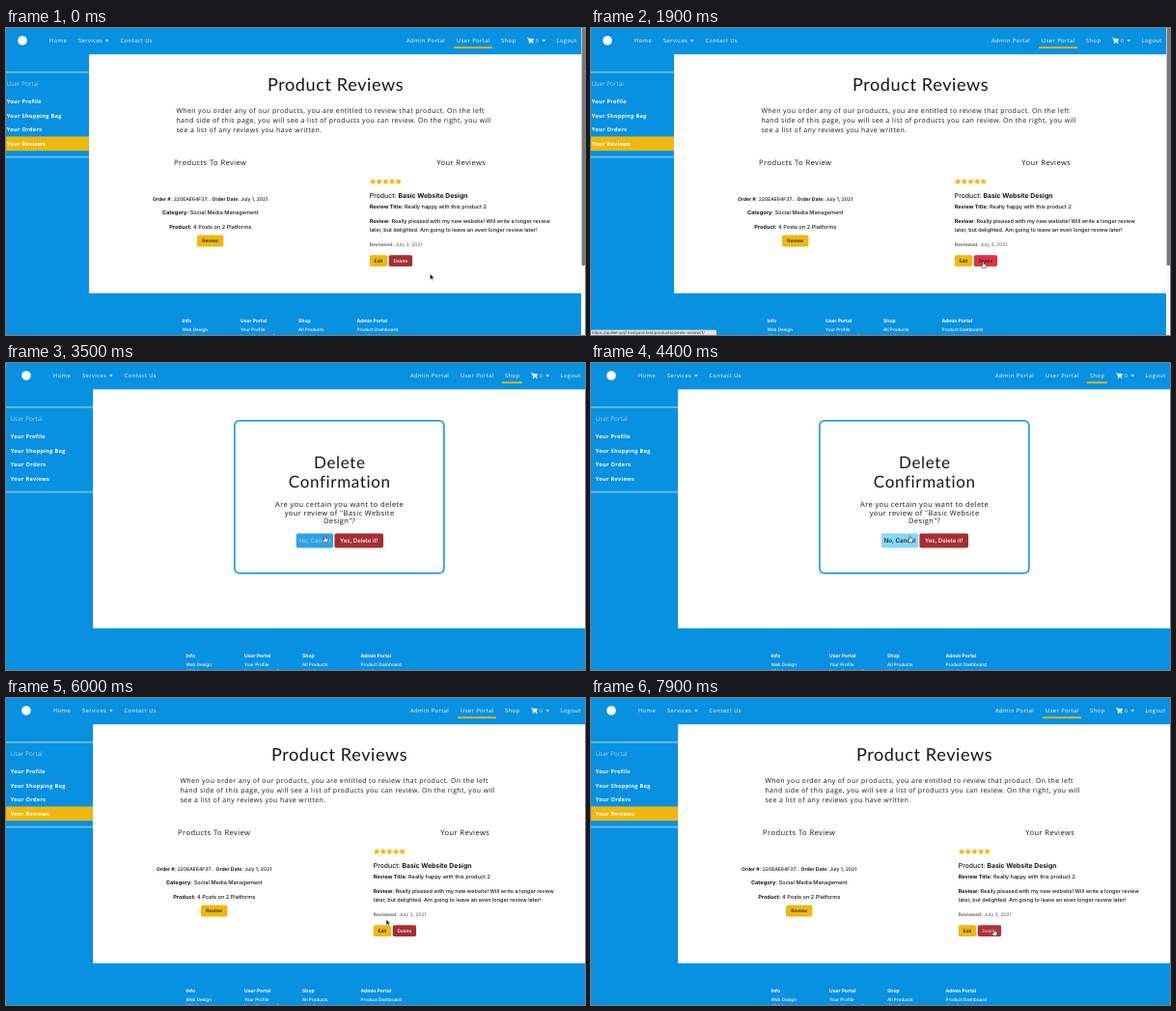
Write an HTML page that moves like this. It is 600 px wide and 318 px high and loops after 8 s.

```html
<!DOCTYPE html>
<html lang="en">
<head>
<meta charset="utf-8">
<title>Product reviews</title>
<style>
  html, body { margin: 0; width: 100%; height: 100%; overflow: hidden; background: #0890e1; }
  svg { display: block; width: 600px; height: 318px; }
  text { white-space: pre; text-rendering: geometricPrecision; }
  .open { font-family: "Open Sans", "Noto Sans", sans-serif; letter-spacing: .417px; font-weight: 450; }
  .ui { font-family: Inter, Roboto, sans-serif; font-weight: 450; }
  .head { font-family: Lato, "Open Sans", sans-serif; }
  .mid { text-anchor: middle; }
  .w { fill: #fff; }
  .k { fill: #14171a; }
  .b { font-weight: 650; }
</style>
</head>
<body>
<svg id="stage" viewBox="0 0 600 318" xmlns="http://www.w3.org/2000/svg"></svg>
<script>
const BLUE = '#0890e1', GOLD = '#efb810', RED = '#a52e36', INK = '#14171a';
const LOOP = 8000, TO_CONFIRM = 2150, TO_REVIEWS = 5250;

const text = (x, y, size, cls, s, extra = '') =>
  `<text x="${x}" y="${y}" font-size="${size}" class="${cls}" ${extra}>${s}</text>`;
const rect = (x, y, w, h, fill, extra = '') =>
  `<rect x="${x}" y="${y}" width="${w}" height="${h}" fill="${fill}" ${extra}/>`;
const bold = s => `<tspan class="b">${s}</tspan>`;
const button = (id, x, y, w, h, fill, cls, size, s, extra) =>
  `<g id="${id}">${rect(x, y, w, h, fill, 'rx="1.8"')}` +
  text(x + w / 2, y + h / 2 + size * .36, size, 'ui mid ' + cls, s, extra) + '</g>';
const caret = x => `<path d="M${x} 12.2h3.6l-1.8 2z" fill="#fff"/>`;

function star(cx, cy) {
  let d = '';
  for (let i = 0; i < 10; i++) {
    const r = i % 2 ? 1.65 : 3.4, a = (i / 5 - .5) * Math.PI;
    d += (i ? 'L' : 'M') + (cx + r * Math.cos(a)).toFixed(2) + ' ' + (cy + r * Math.sin(a)).toFixed(2);
  }
  return `<path d="${d}z" fill="${GOLD}"/>`;
}

function nav() {
  const items = [[45, 'Home'], [75, 'Services'], [118.5, 'Contact Us'], [415, 'Admin Portal'],
    [467, 'User Portal'], [513, 'Shop'], [570.5, 'Logout']];
  return '<circle cx="17" cy="13" r="4.8" fill="#fff"/>' +
    items.map(([x, s]) => text(x, 15.4, 5.8, 'open w', s, 'style="font-weight:500"')).join('') +
    caret(103) + caret(555.4) + text(548.9, 15.2, 5, 'open w', '0', 'style="font-weight:500"') +
    `<path d="M540 10.3h1.4l.9 4.2h4" fill="none" stroke="#fff" stroke-width=".7"/>
     <path d="M541.6 10.9h5.2l-.7 2.8h-3.9z" fill="#fff"/>
     <circle cx="542.7" cy="15.5" r=".7" fill="#fff"/><circle cx="545.7" cy="15.5" r=".7" fill="#fff"/>` +
    rect(464, 19.4, 40, 1.8, GOLD, 'id="lineUser"') + rect(510, 19.4, 21, 1.8, GOLD, 'id="lineShop"');
}

function sidebar() {
  const items = ['Your Profile', 'Your Shopping Bag', 'Your Orders', 'Your Reviews'];
  return rect(-4, 44.9, 90, 1.8, '#6bbff1') + rect(-4, 132.7, 90, 1.8, '#6bbff1') +
    rect(-4, 112.4, 90, 14.8, GOLD, 'id="active"') +
    text(.7, 60.4, 6.3, 'open w', 'User Portal', 'style="letter-spacing:.12px;font-weight:350"') +
    items.map((s, i) => text(.7, 78.1 + i * 14.55, 5.6, 'open w b', s, 'style="letter-spacing:.3px"')).join('');
}

function footer() {
  const cols = [
    [182.5, 'Info', 'Web Design', 'SEO Services'],
    [243, 'User Portal', 'Your Profile', 'Your Shopping Bag'],
    [303, 'Shop', 'All Products', 'Web Design'],
    [363.5, 'Admin Portal', 'Product Dashboard', 'User Dashboard']];
  return cols.map(([x, title, ...links]) => text(x, 304.8, 5, 'ui w b', title) +
    links.map((s, i) => text(x, 314.2 + i * 6.9, 4.6, 'ui w', s, 'style="font-weight:500"')).join('')).join('');
}

function reviews() {
  const intro = [
    'When you order any of our products, you are entitled to review that product. On the left',
    'hand side of this page, you will see a list of products you can review. On the right, you will',
    'see a list of any reviews you have written.'];
  return text(341.6, 64.8, 18.1, 'head mid k', 'Product Reviews', 'letter-spacing=".6"') +
    intro.map((s, i) => text(176.4, 87.9 + i * 10.1, 6.95, 'open k', s)).join('') +
    text(211.7, 141.6, 7.55, 'open mid k', 'Products To Review') +
    text(471.7, 141.6, 7.55, 'open mid k', 'Your Reviews') +
    text(211.7, 178.9, 5.05, 'ui mid k', bold('Order #:') + ' 220EAE64F37... ' + bold('Order Date:') + ' July 1, 2021') +
    text(211.7, 193.3, 5.6, 'ui mid k', bold('Category:') + ' Social Media Management') +
    text(211.7, 207.8, 5.6, 'ui mid k', bold('Product:') + ' 4 Posts on 2 Platforms') +
    button('review', 198, 214.5, 27.4, 12, GOLD, 'k', 4.9, 'Review') +
    [0, 1, 2, 3, 4].map(i => star(380.1 + i * 6.65, 159.2)).join('') +
    text(376.8, 176.2, 6.85, 'ui k', 'Product: ' + bold('Basic Website Design')) +
    text(376.8, 187.4, 5.55, 'ui k', bold('Review Title:') + ' Really happy with this product 2') +
    text(376.8, 202.1, 5.52, 'ui k', bold('Review:') + ' Really pleased with my new website! Will write a longer review') +
    text(376.8, 210.7, 5.52, 'ui k', 'later, but delighted. Am going to leave an even longer review later!') +
    text(376.8, 225.5, 4.95, 'ui', bold('Reviewed:') + ' July 3, 2021', 'fill="#686e74"') +
    button('edit', 376.8, 235.3, 18.2, 11.8, GOLD, 'k', 4.8, 'Edit') +
    button('del', 396.7, 235.3, 24.4, 11.8, RED, 'w', 4.75, 'Delete', 'style="font-weight:500"');
}

function confirmBox() {
  const lines = ['Are you certain you want to delete', 'your review of "Basic Website', 'Design"?'];
  return rect(232.9, 59.8, 217, 158, '#fff', `rx="5" stroke="${BLUE}" stroke-width="1.5"`) +
    text(341.8, 109.2, 17, 'head mid k', 'Delete', 'letter-spacing=".66"') +
    text(341.8, 129, 17, 'head mid k', 'Confirmation', 'letter-spacing=".66"') +
    lines.map((s, i) => text(341.6, 148.8 + i * 8.75, 7.46, 'open mid k', s)).join('') +
    button('cancel', 296.8, 176.4, 38.2, 15.2, BLUE, 'w', 6.2, 'No, Cancel') +
    button('yes', 336.4, 176.4, 50.6, 15.2, RED, 'w', 6.05, 'Yes, Delete it!', 'style="font-weight:500"');
}

document.getElementById('stage').innerHTML = rect(0, 0, 600, 318, BLUE) +
  '<g id="page">' + rect(86, 27.3, 510, 247.4, '#fff') + nav() + sidebar() + footer() +
  `<g id="reviews">${reviews()}</g><g id="confirm">${confirmBox()}</g></g>` +
  `<g id="bar">${rect(596, 0, 4, 318, '#fafafa')}${rect(596.6, 0, 3.4, 246, '#777', 'rx="1"')}</g>` +
  `<g id="status"><rect y="312.8" height="6" rx="1" fill="#dfe3e6"/>${text(1, 317, 4.2, 'ui', '', 'fill="#40464c"')}</g>` +
  `<path id="arrow" d="M0 0V6.2L1.5 4.9L2.5 7.1L3.5 6.7L2.5 4.5H4.4Z" fill="#111" stroke="#fff" stroke-width=".5"/>
   <path id="hand" d="M-.7 .2Q0 -.6 .6 .2V2.2L2.9 2.8Q3.4 3 3.2 4L2.6 6.4H-1L-2.5 3.9Q-2.2 3 -.7 4Z" fill="#fff" stroke="#222" stroke-width=".6"/>`;

const el = id => document.getElementById(id);
const show = (id, on) => el(id).setAttribute('visibility', on ? 'visible' : 'hidden');
const clamp = v => Math.max(0, Math.min(1, v));
const hex = c => [1, 3, 5].map(i => parseInt(c.slice(i, i + 2), 16));
const mix = (a, b, p) => {
  const to = hex(b);
  return `rgb(${hex(a).map((v, i) => Math.round(v + (to[i] - v) * p))})`;
};
function tint(id, p, from, to, ink, inkTo) {
  const [box, label] = el(id).children;
  box.setAttribute('fill', mix(from, to, p));
  label.style.fill = mix(ink, inkTo, p);
}

// time, x, y of the pointer tip
const path = [[0, 439.3, 254.5], [700, 437, 253.5], [1250, 406.5, 242.3], [2050, 406.5, 242.3],
  [2250, 403, 241.5], [2600, 403, 241.5], [3400, 330.5, 179.3], [4650, 330.5, 179.3], [5050, 385.5, 223.5],
  [5400, 385.5, 223.5], [5950, 394, 229.2], [6300, 394, 229.2], [6600, 391, 239], [7150, 391, 239],
  [7800, 417.8, 239.8], [8000, 417.8, 239.8]];
const hands = [[1130, 2620], [3330, 4720], [6560, 7250], [7740, 8000]];
const host = 'https://quillet-pq7.hostyard.test/';
const links = [[1500, 2600, 130, 'products/delete-review/1/'], [4620, 5600, 118, 'user-portal/reviews'],
  [6700, 7100, 126, 'products/edit-review/1/']];
const within = (t, [a, b]) => t >= a && t < b;

function pointer(t) {
  const i = path.findIndex(p => p[0] > t), a = path[i - 1], b = path[i];
  const u = (t - a[0]) / (b[0] - a[0]), e = u * u * (3 - 2 * u);
  return [a[1] + (b[1] - a[1]) * e, a[2] + (b[2] - a[2]) * e];
}

function draw(t) {
  const asking = within(t, [TO_CONFIRM, TO_REVIEWS]);
  el('page').setAttribute('transform', `translate(${t < TO_CONFIRM ? 0 : 4})`);
  show('bar', t < TO_CONFIRM);
  show('confirm', asking);
  for (const id of ['reviews', 'active', 'lineUser']) show(id, !asking);
  show('lineShop', asking);
  el('lineShop').setAttribute('opacity', clamp((t - TO_CONFIRM) / 250));

  const delHover = t < TO_CONFIRM ? (t - 1130) / 280 : (t - 7820) / 320;
  tint('del', clamp(delHover), RED, '#dc3545', '#ffffff', INK);
  tint('cancel', clamp((t - 3420) / 300), BLUE, '#83d8fd', '#ffffff', INK);
  const editHover = Math.min((t - 6560) / 200, (7400 - t) / 200);
  tint('edit', clamp(editHover), GOLD, '#f8d15a', INK, INK);

  const link = links.find(l => within(t, l));
  show('status', link);
  if (link) {
    const [box, label] = el('status').children;
    box.setAttribute('width', link[2]);
    label.textContent = host + link[3];
  }

  const [x, y] = pointer(t), hand = hands.some(h => within(t, h));
  show('hand', hand);
  show('arrow', !hand);
  el(hand ? 'hand' : 'arrow').setAttribute('transform', `translate(${x} ${y})`);
}

const start = performance.now();
function tick() {
  draw((performance.now() - start) % LOOP);
  requestAnimationFrame(tick);
}
tick();
</script>
</body>
</html>
```
